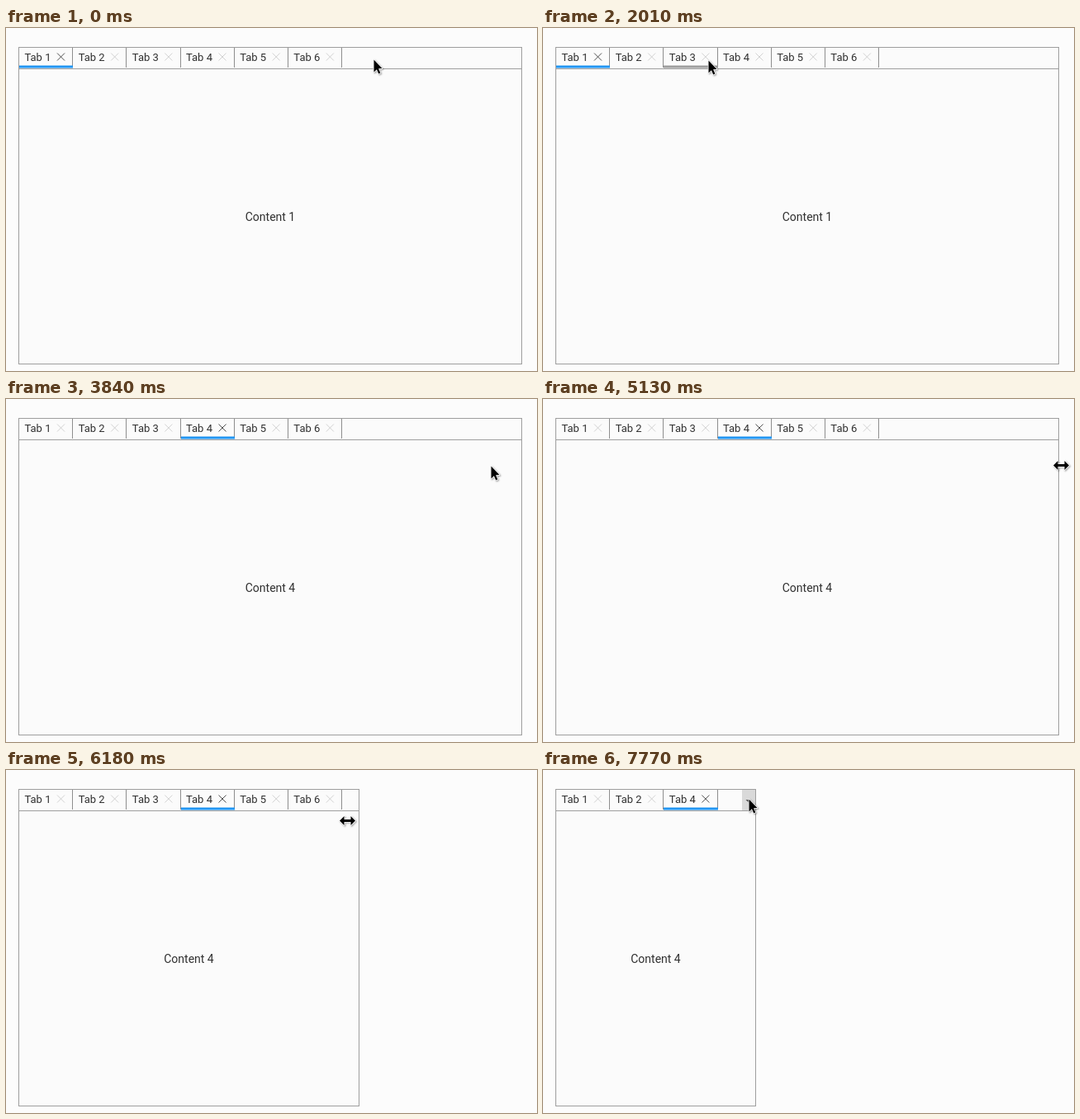
An HTML page with a canvas that plays this animation: 643x416 px, repeating every 8000 ms.

```html
<!DOCTYPE html>
<html lang="en">
<head>
<meta charset="utf-8">
<title>Tab panel</title>
<style>
html, body { margin: 0; width: 100%; height: 100%; overflow: hidden; background: #fcfcfc; }
canvas { display: block; width: 643px; height: 416px; }
</style>
</head>
<body>
<canvas id="stage"></canvas>
<script>
const W = 643, H = 416, LOOP = 8000, STEP = 30;
const LEFT = 16, TOP = 23, BOTTOM = 407, PITCH = 65.17, TABS = 6;
const LINE = '#9e9e9e', BLUE = '#2196f3';
const CLICK = 2820, GRAB = 4950, DROP = 7140, RELEASE = 7290;
const DRAG_LAG = 58, HOVER_LAG = 90;

// Where the pointer turns, rests or changes pace: time, x, y
const PATH = [
  [345, 445, 38], [1140, 253, 41], [1620, 170, 41], [2010, 200, 39],
  [2460, 236, 34], [2820, 236, 34], [3600, 520, 75], [3840, 587, 81],
  [4110, 624, 80], [4900, 624, 80], [5130, 627, 80], [5480, 627, 80],
  [6180, 413, 61], [6690, 299, 62], [7000, 261, 62], [DROP, 260, 62],
  [7770, 249, 35]
];

const stage = document.getElementById('stage');
const g = stage.getContext('2d');
const dpr = window.devicePixelRatio || 1;
stage.width = W * dpr;
stage.height = H * dpr;
g.scale(dpr, dpr);

const clamp = (v, lo, hi) => Math.min(hi, Math.max(lo, v));

// Slope at a key; zero at turning points so the path never overshoots
function slope(i, c) {
  const a = PATH[i - 1], b = PATH[i], d = PATH[i + 1];
  if (!a || !d) return 0;
  const s = (b[c] - a[c]) / (b[0] - a[0]);
  const r = (d[c] - b[c]) / (d[0] - b[0]);
  return s * r <= 0 ? 0 : 2 * s * r / (s + r);
}

function pointer(t) {
  const last = PATH.length - 1;
  t = clamp(t, PATH[0][0], PATH[last][0]);
  let i = 0;
  while (i < last - 1 && PATH[i + 1][0] <= t) i++;
  const a = PATH[i], b = PATH[i + 1], d = b[0] - a[0], u = (t - a[0]) / d;
  const at = c => {
    const e = u * u * (3 - 2 * u);
    return a[c] + (b[c] - a[c]) * e
      + d * u * (1 - u) * ((1 - u) * slope(i, c) - u * slope(i + 1, c));
  };
  return { x: Math.round(at(1)), y: Math.round(at(2)) };
}

function rightEdge(t) {
  return t < 5520 ? 624 : pointer(Math.min(t - DRAG_LAG, DROP)).x - 3;
}

function hoverSlot(t) {
  const p = pointer(t - HOVER_LAG);
  return p.y > TOP && p.y < 49 ? Math.floor((p.x - LEFT) / PITCH) : -1;
}

function hoverLevel(slot, t) {
  let sum = 0;
  for (let k = 0; k < 6; k++) sum += hoverSlot(t - k * STEP) === slot;
  return sum / 6;
}

function rect(color, x, y, w, h, alpha = 1) {
  g.globalAlpha = alpha;
  g.fillStyle = color;
  g.fillRect(x, y, w, h);
  g.globalAlpha = 1;
}

function text(str, x, y, size, align) {
  g.font = size + 'px Roboto, sans-serif';
  g.textAlign = align;
  g.fillStyle = '#303030';
  g.fillText(str, x, y);
}

function cross(x, y, color) {
  const r = 4.5;
  g.strokeStyle = color;
  g.lineWidth = 1;
  g.beginPath();
  for (const s of [-1, 1]) {
    g.moveTo(x - r, y - r * s);
    g.lineTo(x + r, y + r * s);
  }
  g.stroke();
}

function shape(x, y, points) {
  g.beginPath();
  points.forEach(([px, py]) => g.lineTo(x + px, y + py));
  g.closePath();
}

function drawTab(slot, id, active, t) {
  const x = LEFT + slot * PITCH;
  const from = Math.floor(x + 0.5), to = Math.floor(x + PITCH - 0.5);
  rect('#8e8e8e', to, TOP + 1, 1, 24);
  text('Tab ' + id, x + 6.5, 40, 13, 'left');
  cross(x + 50.5, 35, id === active ? '#505050' : '#d2d2d2');

  const bar = (color, alpha) => rect(color, from, 45.5, to + 1 - from, 3, alpha);
  const fade = clamp((t - CLICK + STEP) / 180, 0, 1);
  bar(LINE, hoverLevel(slot, t));
  if (id === 4) bar(BLUE, fade);
  if (id === 1) bar(BLUE, 1 - fade);
}

function drawMenuButton(right, p) {
  const over = p.y < 49 && p.x > right - 17;
  rect(over ? '#d9d9d9' : '#e0e0e0', right - 16, TOP + 1, 16, 25);
  shape(right - 8.5, 36, [[-3, 0], [3, 0], [0, 3]]);
  g.fillStyle = '#505050';
  g.fill();
}

function drawPanel(t, p) {
  const right = rightEdge(t), active = t < CLICK ? 1 : 4;
  rect('#fbfbfb', LEFT, TOP, right - LEFT, BOTTOM - TOP);
  rect(LINE, 15, 49, right - 15, 1);

  const overflow = right < LEFT + TABS * PITCH;
  const count = overflow ? Math.floor((right - LEFT - 17) / PITCH) : TABS;
  for (let s = 0; s < count; s++) {
    const id = s === count - 1 && active > count ? active : s + 1;
    drawTab(s, id, active, t);
  }
  if (overflow) drawMenuButton(right, p);

  g.strokeStyle = LINE;
  g.lineWidth = 1;
  g.strokeRect(15.5, TOP + 0.5, right - 15, BOTTOM - TOP);
  text('Content ' + active, (right + 16) / 2, 234, 14, 'center');
}

const ARROW = [[0, 0], [0, 15], [3.4, 11.8], [5.7, 17], [7.9, 16], [5.6, 10.8], [10, 10.6]];
const halfSizer = s => [[9.5, 0], [4, 5.5], [4, 1.5], [-4, 1.5], [-4, 5.5]]
  .map(([x, y]) => [x * s, y * s]);
const SIZER = [...halfSizer(1), ...halfSizer(-1)];

function drawPointer(t, p) {
  const sizing = t >= GRAB && t < RELEASE;
  shape(p.x + 0.5, p.y + 0.5, sizing ? SIZER : ARROW);
  g.save();
  g.shadowColor = 'rgba(0,0,0,0.4)';
  g.shadowBlur = 2 * dpr;
  g.shadowOffsetX = g.shadowOffsetY = dpr;
  g.lineJoin = 'round';
  g.lineWidth = 1.6;
  g.strokeStyle = '#fff';
  g.stroke();
  g.restore();
  g.fillStyle = '#000';
  g.fill();
}

function draw(now) {
  const t = Math.floor((now % LOOP) / STEP) * STEP;
  const p = pointer(t);
  rect('#fcfcfc', 0, 0, W, H);
  drawPanel(t, p);
  drawPointer(t, p);
}

let start;
function tick(now) {
  if (start === undefined) start = now;
  draw(Math.max(0, now - start));
  requestAnimationFrame(tick);
}
draw(0);
requestAnimationFrame(tick);
</script>
</body>
</html>
```
